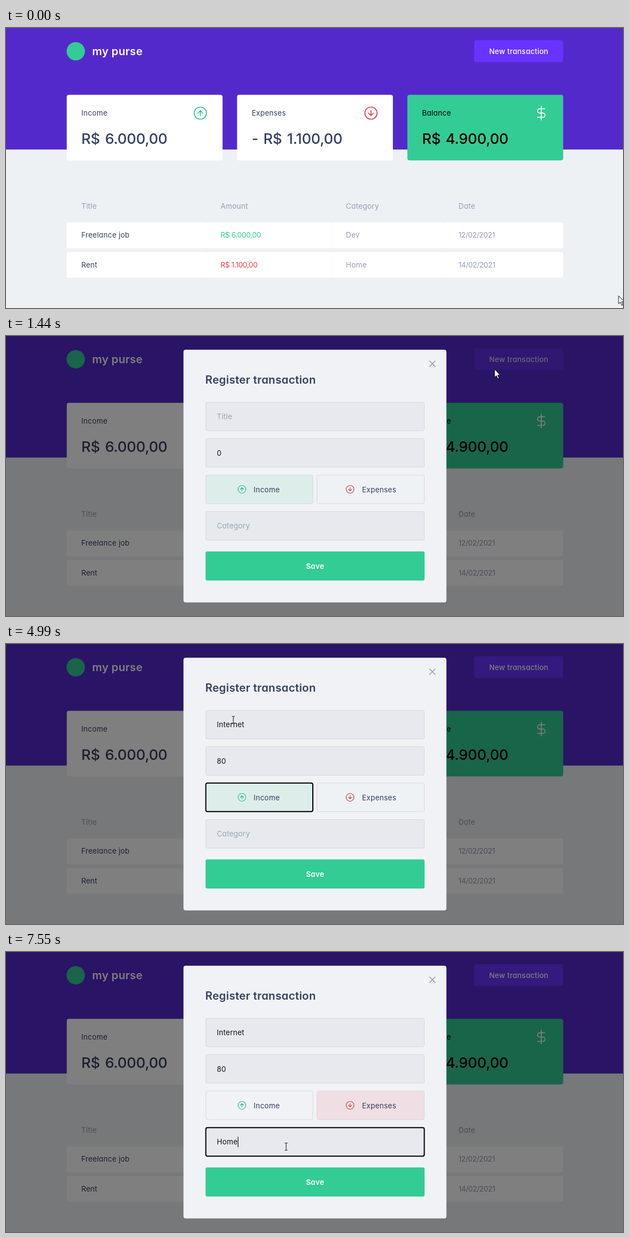
Recreate the animation shown at these times as an HTML page. Size 1110 px wide and 505 px high, loop 8 s.

```html
<!DOCTYPE html>
<html lang="en">
<head>
<meta charset="utf-8">
<title>Register transaction</title>
<style>
  html, body { margin: 0; height: 100%; overflow: hidden; background: #eef1f4; }
  svg { display: block; width: 100vw; height: 100vh; }
  text {
    font: 400 13.13px Inter, "Open Sans", sans-serif;
    font-feature-settings: "cv11";
    letter-spacing: .015em;
    white-space: pre;
  }
  .num { letter-spacing: -.025em; }
  .big { font-size: 26.26px; font-weight: 460; letter-spacing: -.01em; word-spacing: .09em; }
  .head { font-size: 19.7px; font-weight: 600; }
  .medium { font-weight: 500; }
  .bold { font-weight: 600; }
  .mid { text-anchor: middle; }
  .icon { fill: none; stroke-linecap: round; stroke-linejoin: round; }
</style>
</head>
<body>
<svg id="stage" viewBox="0 0 1110 505"></svg>
<script>
const LOOP = 8000;
const GREEN = '#33cc95', RED = '#e0444a', NAVY = '#363f5f', GREY = '#969cb3';
const BORDER = '#d5d8dc', FIELD = '#e7e9ee', PLACEHOLDER = '#94a6b4', INK = '#111';

const rect = (x, y, w, h, fill, rx = 3, extra = '') =>
  `<rect x="${x}" y="${y}" width="${w}" height="${h}" rx="${rx}" fill="${fill}" ${extra}/>`;
const text = (x, y, str, fill, cls = '', extra = '') =>
  `<text x="${x}" y="${y}" fill="${fill}" class="${cls}" ${extra}>${str}</text>`;

// Circled arrow, pointing up or down (dir = -1 or 1).
const arrowIcon = (x, y, r, dir, color, width) =>
  `<g class="icon" transform="translate(${x} ${y})" stroke="${color}" stroke-width="${width}">
    <circle r="${r}"/>
    <path transform="scale(${r / 10} ${dir * r / 10})" d="M0-4V4M-4 0 0 4 4 0"
      vector-effect="non-scaling-stroke"/></g>`;

const card = (x, label, value, fill, labelColor, valueColor, icon) =>
  rect(x, 120.6, 280.3, 118.2, fill, 4) + text(x + 26.3, 158, label, labelColor) +
  text(x + 26.3, 208.5, value, valueColor, 'big') + icon;

const columns = [109.3, 360, 585.3, 788, 1002.3];
const columnText = [135.5, 386, 611.5, 814];
const row = (y, cells, amountColor) => cells.map((str, i) =>
  rect(columns[i], y, columns[i + 1] - columns[i], 46.6, '#fff') +
  text(columnText[i], y + 27.5, str, [NAVY, amountColor, GREY, GREY][i], i % 2 ? 'num' : '')
).join('');

const page = `
  ${rect(0, 0, 1110, 505, '#eef1f4', 0)}
  ${rect(0, 0, 1110, 219.2, '#5429cc', 0)}
  <circle cx="125.5" cy="42" r="16.5" fill="${GREEN}"/>
  ${text(155, 48.5, 'my purse', '#fff', 'head')}
  <g id="newButton">
    ${rect(842.2, 22.1, 160, 39.4, '#6933ff', 4)}
    ${text(922.4, 47, 'New transaction', '#fff', 'mid medium', 'id="newLabel"')}
  </g>
  ${card(109.3, 'Income', 'R$ 6.000,00', '#fff', NAVY, NAVY,
    arrowIcon(349.6, 153.5, 11, -1, GREEN, 1.7))}
  ${card(415.7, 'Expenses', '- R$ 1.100,00', '#fff', NAVY, NAVY,
    arrowIcon(656.6, 153.5, 11, 1, RED, 1.7))}
  ${card(722.1, 'Balance', 'R$ 4.900,00', GREEN, '#000', '#000',
    `<path class="icon" transform="translate(949.6 140) scale(1.12)" stroke="#fff" stroke-width="1.5"
      d="M12 1V23M17.5 5H9.5a3.5 3.5 0 0 0 0 7h5a3.5 3.5 0 0 1 0 7H6"/>`)}
  ${['Title', 'Amount', 'Category', 'Date'].map((s, i) => text(columnText[i], 325.5, s, GREY)).join('')}
  ${row(350.7, ['Freelance job', 'R$ 6.000,00', 'Dev', '12/02/2021'], GREEN)}
  ${row(404, ['Rent', 'R$ 1.100,00', 'Home', '14/02/2021'], RED)}`;

const box = (id, x, y, w) =>
  rect(x + .5, y + .5, w - 1, 51.5, FIELD, 3, `id="${id}" stroke="${BORDER}"`);

const input = (id, y) => box(id + 'Box', 359, y, 394) +
  rect(379, y + 16.5, 9, 19, '#0078d7', 0, `id="${id}Select"`) +
  text(379.3, y + 31, '', INK, '', `id="${id}Text"`) +
  rect(379, y + 17, 1, 19, '#000', 0, `id="${id}Caret"`);

const modal = `<g id="modal">
  ${rect(0, 0, 1110, 505, '#000', 0, 'opacity=".5"')}
  ${rect(319.3, 24.7, 473, 455.8, '#f0f2f5', 4)}
  <path class="icon" d="M762 45l10 10m0-10l-10 10" stroke="#969ba6" stroke-width="1.5"/>
  ${text(358.5, 85.5, 'Register transaction', NAVY, 'head')}
  ${input('title', 119)}${input('amount', 184.6)}${input('category', 316.2)}
  <path id="spinner" d="M721.5 208.5l3.5-4 3.5 4zM721.5 213.5l3.5 4 3.5-4z" fill="#777"/>
  ${box('incomeBox', 359, 250.3, 193.5)}${box('expensesBox', 559, 250.3, 194)}
  ${arrowIcon(424.5, 276.5, 7, -1, '#36bd96', 1.2)}${text(445.5, 281.5, 'Income', NAVY)}
  ${arrowIcon(619, 276.5, 7, 1, '#bf4d48', 1.2)}${text(640.5, 281.5, 'Expenses', NAVY)}
  ${rect(359, 388.4, 394, 52.6, GREEN)}
  ${text(556, 419.8, 'Save', '#fff', 'mid bold')}
</g>`;

const pointer = `
  <circle id="click" r="10" fill="#f5cf2e" opacity=".55"/>
  <g id="cursor" stroke-linejoin="round">
    <path id="arrow" fill="#fff" stroke="#000" stroke-width=".9"
      d="M0 0V14.5L3.3 11.5 5.8 17.2 8 16.2 5.6 10.7H10.2Z"/>
    <path id="hand" fill="#fff" stroke="#1c1c30"
      d="M-1.6 1.5a1.6 1.6 0 0 1 3.2 0V7l5 1.1q2 .6 2 2.6 0 4-1.8 7.6h-7.6q-1.4-2.5-4.6-6.2 0-2.2 1.8-2l2 1.6Z"/>
    <path id="ibeam" fill="none" stroke="#111"
      d="M-2.5-6.5H-.5L0-6 .5-6.5H2.5M0-6V6M-2.5 6.5H-.5L0 6 .5 6.5H2.5"/>
  </g>`;

document.getElementById('stage').innerHTML = page + modal + pointer;
const el = id => document.getElementById(id);
const show = (id, on) => el(id).setAttribute('visibility', on ? 'inherit' : 'hidden');
const set = (id, attrs) => {
  for (const name in attrs) el(id).setAttribute(name, attrs[name]);
};
const within = (t, a, b) => t >= a && t < b;

// Pointer moves: first step, last step, number of steps, destination.
const start = [1102, 483];
const moves = [
  [70, 210, 3, 1093, 349],
  [540, 1220, 11, 939, 46],
  [1440, 1440, 1, 879, 60],
  [1500, 1850, 6, 409, 137],
  [5460, 5860, 7, 600, 282],
  [6140, 6350, 4, 504, 351],
];
const smooth = p => p * p * (3 - 2 * p);

function pointerAt(t) {
  let [x, y] = start;
  for (const [t0, t1, steps, toX, toY] of moves) {
    if (t < t0) break;
    const gap = (t1 - t0) / (steps - 1) || 1;
    const p = smooth(Math.min(1, (Math.floor((t - t0) / gap + 1e-6) + 1) / steps));
    x += (toX - x) * p;
    y += (toY - y) * p;
  }
  return [x, y];
}

function cursorKind(x, y, open) {
  const inside = (x0, y0, x1, y1) => x >= x0 && x <= x1 && y >= y0 && y <= y1;
  if (!open) return inside(842, 22, 1002, 62) ? 'hand' : 'arrow';
  if (!inside(359, 119, 753, 441)) return 'arrow';
  if (inside(359, 250, 552, 303) || inside(559, 250, 753, 303)) return 'hand';
  return inside(359, 119, 753, 171) || inside(359, 185, 753, 237) || inside(359, 316, 753, 369)
    ? 'ibeam' : 'arrow';
}

// Each field: placeholder, typed value, key times, focus span, caret-off span.
const fields = {
  title: { hint: 'Title', value: 'Internet', focus: [1920, 4000], off: [2450, 2590],
    keys: [2590, 2790, 3120, 3260, 3330, 3390, 3590, 3660] },
  amount: { hint: '0', value: '80', focus: [4000, 4990], off: [4000, 4660], keys: [4660, 4790] },
  category: { hint: 'Category', value: 'Home', focus: [6490, LOOP], off: [7020, 7220],
    keys: [7220, 7350, 7490, 7550] },
};

function outline(id, focused, hover) {
  set(id, { stroke: focused ? '#000' : hover ? '#b4b2b8' : BORDER, 'stroke-width': focused ? 2 : 1 });
}

function drawField(id, f, t) {
  const typed = f.value.slice(0, f.keys.filter(k => t >= k).length);
  const focused = within(t, ...f.focus);
  const selected = id === 'amount' && focused && !typed;
  const label = el(id + 'Text');
  label.textContent = typed || f.hint;
  label.setAttribute('fill', selected ? '#fff' : typed || id === 'amount' ? INK : PLACEHOLDER);
  outline(id + 'Box', focused);
  show(id + 'Select', selected);
  show(id + 'Caret', focused && !within(t, ...f.off));
  const width = typed ? label.getComputedTextLength() : 0;
  set(id + 'Caret', { x: Math.round(379 + width) });
}

function draw(t) {
  const open = t >= 1440;
  const [x, y] = pointerAt(t);
  const kind = cursorKind(x, y, open);

  // Hovering dims the label first, then the button behind it.
  set('newLabel', { fill: within(t, 1220, 1500) ? '#f0ecfa' : '#fff' });
  el('newButton').style.filter = within(t, 1370, 1500) ? 'brightness(.9)' : 'none';

  show('modal', open);
  for (const id in fields) drawField(id, fields[id], t);
  show('spinner', within(t, 4000, 4990) || (t > 5460 && kind === 'ibeam' && y > 185 && y < 237));

  const expense = t >= 6070;
  set('incomeBox', { fill: expense ? '#f0f2f5' : '#ddeeea' });
  set('expensesBox', { fill: expense ? '#efdee3' : '#eff2f5' });
  outline('incomeBox', within(t, 4990, 6000));
  outline('expensesBox', false, kind === 'hand' && x > 559 && open);

  for (const name of ['arrow', 'hand', 'ibeam']) show(name, name === kind);
  set('cursor', { transform: `translate(${x} ${y})` });
  show('click', within(t, 1290, 1440) || within(t, 1920, 1990) ||
    within(t, 6000, 6070) || within(t, 6490, 6560));
  set('click', { cx: x, cy: y - .5 });
}

const began = performance.now();
function tick() {
  draw((performance.now() - began) % LOOP);
  requestAnimationFrame(tick);
}
tick();
</script>
</body>
</html>
```
